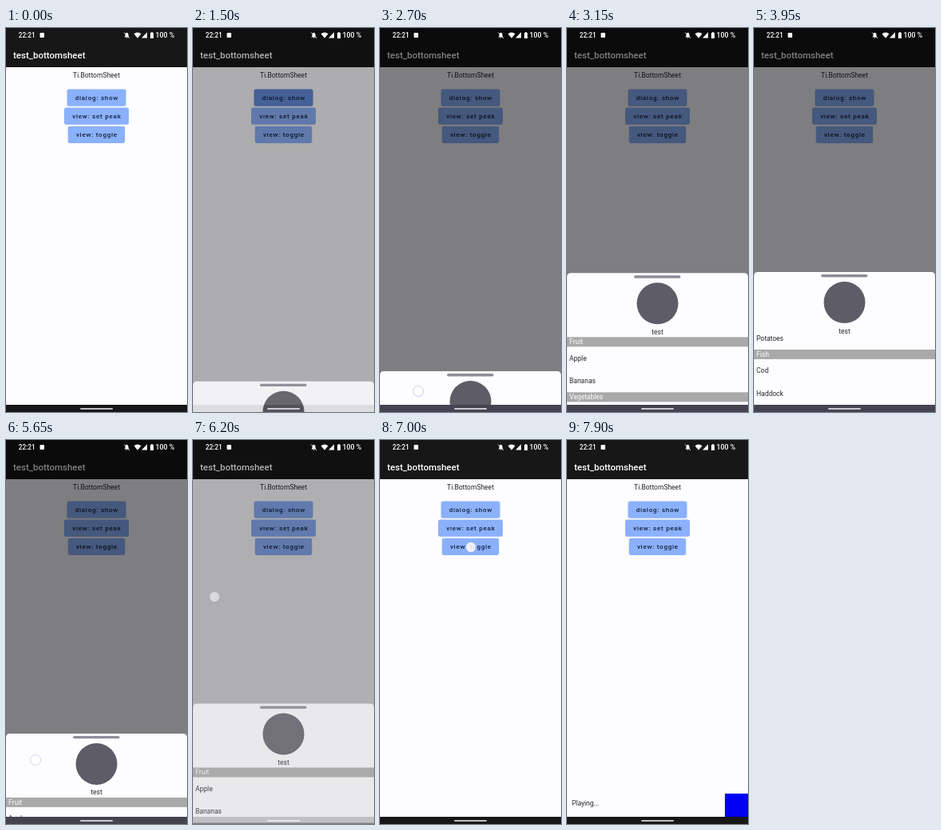
An HTML page that plays this animation: 227 by 480 pixels, repeating every 8000 ms.

```html
<!DOCTYPE html>
<html lang="en">
<head>
<meta charset="utf-8">
<title>Bottom sheet demo</title>
<style>
  html, body { margin: 0; width: 100%; height: 100%; overflow: hidden; background: #fdfcff; }
  svg { display: block; }
  text { font: 8.5px Roboto, sans-serif; fill: #25242a; }
  .button text { font-size: 8.1px; font-weight: 500; letter-spacing: .72px; text-anchor: middle; fill: #14213c; }
  .bar { fill: #181718; }
  .title { font-size: 11.5px; font-weight: 500; fill: #fff; }
  .status text { font-size: 8.8px; font-weight: 500; fill: #fff; }
  .mid { text-anchor: middle; }
</style>
</head>
<body>
<svg id="stage" width="227" height="480" viewBox="0 0 227 480">
  <rect width="227" height="480" fill="#fdfcff"/>
  <rect class="bar" width="227" height="49"/>
  <text class="title" x="9" y="38">test_bottomsheet</text>
  <text class="mid" x="113.5" y="62">Ti.BottomSheet</text>
  <g id="buttons"></g>

  <g id="player">
    <rect width="227" height="29" fill="#fdfcff"/>
    <text x="6" y="15">Playing...</text>
    <rect x="198" width="29" height="29" fill="#0000f5"/>
  </g>
  <rect class="bar" y="471" width="227" height="9"/>
  <rect id="dim" width="227" height="480"/>

  <g id="dialog">
    <g id="sheet">
      <path d="M0 180V5Q0 0 5 0H222Q227 0 227 5V180Z" fill="#fdfcff"/>
      <rect x="84" y="3" width="58.5" height="3.4" rx="1.7" fill="#8f8d99"/>
      <circle cx="113.5" cy="38" r="26" fill="#5e5c66"/>
      <text class="mid" x="113.5" y="76.5">test</text>
      <svg y="78" width="227" height="88" viewBox="0 -2 227 88"><g id="list"></g></svg>
    </g>
    <rect y="471" width="227" height="109" fill="#454350"/>
  </g>

  <g class="status" fill="#fff">
    <text x="15.8" y="12" style="font-size:8.2px">22:21</text>
    <rect x="42.5" y="6" width="5.5" height="6" rx="1"/>
    <path d="M148.5 11.5L149.5 10V8Q149.8 6 151.5 5.8Q153.3 6 153.5 8V10L154.5 11.5ZM150.7 12H152.3L151.5 13Z"/>
    <path d="M148 5.5L155 13" stroke="#fff" stroke-width=".8"/>
    <path d="M160.5 7.2Q165 3.8 169.5 7.2L165 12.8ZM170 12.5L177 5.3V12.5Z"/>
    <path d="M181 6H182.2V5H183.8V6H185V13H181Z"/>
    <text x="187.5" y="12">100 %</text>
  </g>
  <rect x="93" y="475.2" width="41" height="1.6" rx=".8" fill="#f4f3fa"/>
  <circle id="touch" r="6.5" fill="#fff" fill-opacity=".85" stroke="#8088d8" stroke-opacity=".5" stroke-width=".8"/>
</svg>

<script>
const LOOP = 8000;
const $ = id => document.getElementById(id);
const clamp = v => Math.max(0, Math.min(1, v));
const progress = (t, start, length) => clamp((t - start) / length);
const lerp = (a, b, p) => a + (b - a) * p;
const quint = p => 1 - (1 - p) ** 5;
const cubic = p => 1 - (1 - p) ** 3;
const shift = (id, y) => $(id).setAttribute('transform', `translate(0 ${y})`);

// Each key is [time, value, easing towards it].
function track(t, keys) {
  if (t <= keys[0][0]) return keys[0][1];
  const i = keys.findIndex(k => k[0] > t);
  if (i < 0) return keys[keys.length - 1][1];
  const [t0, v0] = keys[i - 1], [t1, v1, ease = p => p] = keys[i];
  return lerp(v0, v1, ease((t - t0) / (t1 - t0)));
}

const buttons = [
  ['dialog: show', 76.5, 74, 76.5],
  ['view: set peak', 73, 81, 99.5],
  ['view: toggle', 77.7, 71.5, 122.7]
];
$('buttons').innerHTML = buttons.map(([label, x, w, y]) => {
  const box = `x="${x}" y="${y}" width="${w}" height="21.2" rx="2.3"`;
  return `<g class="button"><rect ${box} fill="#8bb1fc"/>
    <rect class="ripple" ${box} fill="#2f56b0" opacity="0"/>
    <text x="113.9" y="${y + 13.5}">${label}</text></g>`;
}).join('');
const ripples = document.querySelectorAll('.ripple');

const sections = {
  Fruit: ['Apple', 'Bananas'],
  Vegetables: ['Carrots', 'Potatoes'],
  Fish: ['Cod', 'Haddock']
};
let rowY = 0, rows = '';
for (const [name, items] of Object.entries(sections)) {
  rows += `<rect y="${rowY}" width="227" height="12" fill="#a9a9a9"/>
    <text x="3" y="${rowY + 9}" style="fill:#fff">${name}</text>`;
  rowY += 12;
  for (const item of items) {
    rows += `<text x="3" y="${rowY + 17.2}">${item}</text>`;
    rowY += 28.5;
  }
}
$('list').innerHTML = rows;

const sheetTop = [
  [2770, 429], [2900, 385], [3350, 305, quint],
  [4620, 305], [4775, 345], [5261, 429, quint],
  [5500, 429], [5630, 385], [6050, 305, quint]
];
const listScroll = [
  [3400, 0], [3530, 55], [3930, 121, cubic],
  [4090, 121], [4220, 66], [4550, 0, cubic]
];
// Down time, up time, start and end point.
const gestures = [
  [1200, 1300, 112, 88, 112, 88],
  [2700, 2900, 48, 454, 44, 395],
  [3350, 3530, 46, 444, 43, 385],
  [4050, 4220, 41, 398, 42, 453],
  [4580, 4775, 40, 318, 41.5, 365],
  [5450, 5630, 40, 452, 37, 400],
  [6010, 6125, 27, 196, 27, 196],
  [7000, 7100, 114, 134, 114, 134]
];

function drawTouch(t) {
  const g = gestures.find(([down, up]) => t >= down && t < up + 200);
  $('touch').setAttribute('opacity', g ? 1 - progress(t, g[1], 200) : 0);
  if (!g) return;
  const [down, up, x0, y0, x1, y1] = g;
  const p = progress(t, down + 50, up - down - 50);
  $('touch').setAttribute('cx', lerp(x0, x1, p));
  $('touch').setAttribute('cy', lerp(y0, y1, p));
}

function draw(t) {
  const enter = progress(t, 1342, 250);
  const leave = progress(t, 6100, 200);
  const hidden = (1 - enter) ** 2 + leave ** 2;
  $('dim').setAttribute('opacity', .5 * (enter - leave ** 1.4));
  $('dialog').setAttribute('opacity', clamp(1 - hidden));
  shift('dialog', 96 * hidden);
  shift('sheet', track(t, sheetTop));
  shift('list', -track(t, listScroll));
  shift('player', lerp(471, 442, quint(progress(t, 7150, 500))));

  const ripple = start => .4 * (progress(t, start, 150) - progress(t, start + 300, 350));
  ripples[0].setAttribute('opacity', ripple(1200));
  ripples[2].setAttribute('opacity', ripple(7000));
  drawTouch(t);
}

const begin = performance.now();
function tick() {
  draw((performance.now() - begin) % LOOP);
  requestAnimationFrame(tick);
}
tick();
</script>
</body>
</html>
```
